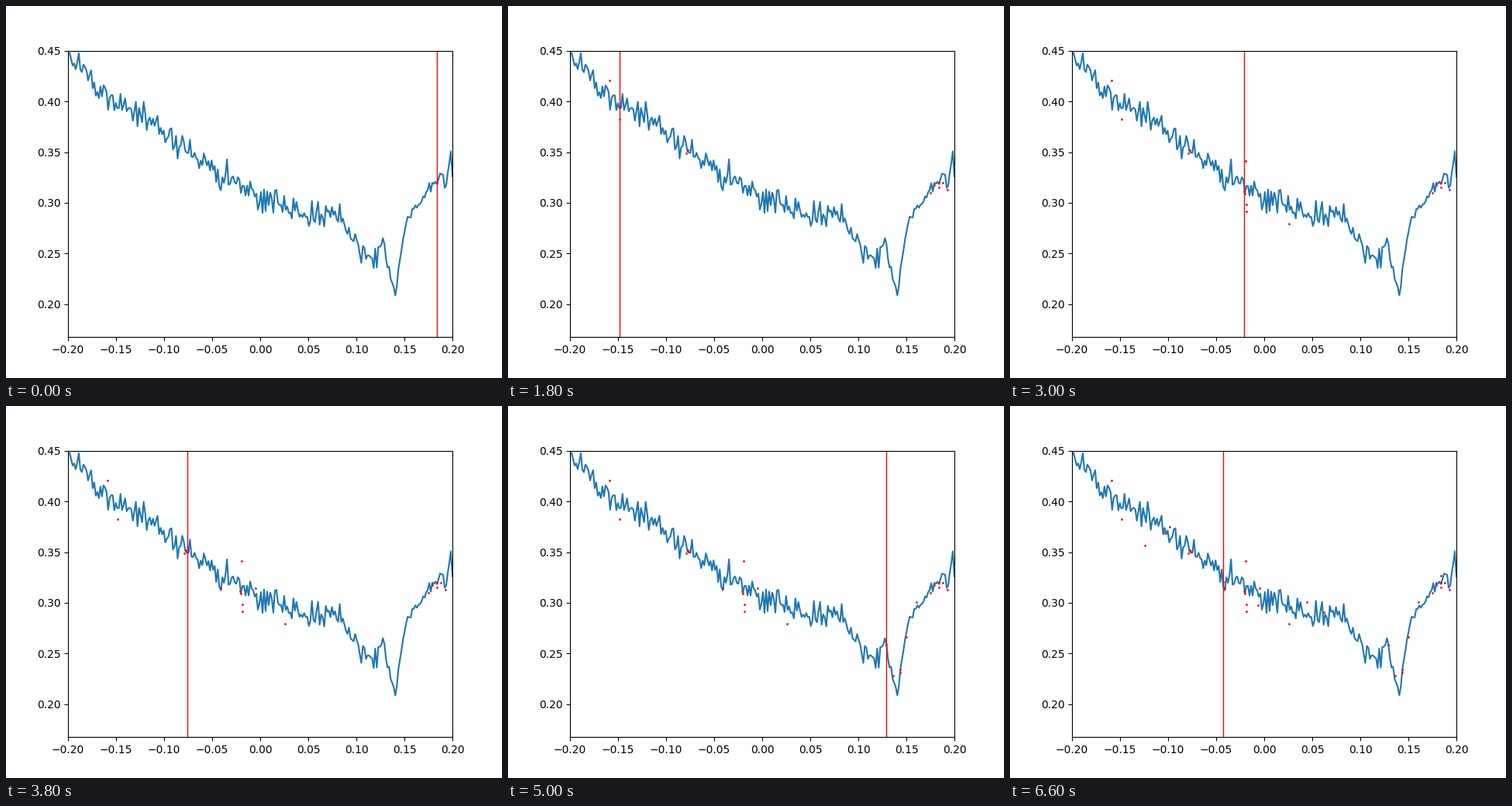
Animation, 640 px wide and 480 px high, one loop 6800 ms. Source, as a matplotlib script:

```python
import numpy as np
import matplotlib.pyplot as plt
from matplotlib.animation import FuncAnimation

W, H, DPI = 640, 480, 100
X_MAX = 0.2
Y_LOW, Y_TOP = 0.1674, 0.4502
AXES_LEFT, AXES_WIDTH = 80, 496
STEP_MS = 200

# Places the search visits, in stage pixels: wide jumps, then short steps
STOPS = np.array([556, 230, 232, 556, 567, 550, 545, 561, 131, 144, 360, 305,
                  305, 304, 303, 302, 95, 322, 277, 234, 527, 506, 506, 514,
                  497, 488, 556, 206, 198, 174, 405, 383, 320, 275])

# Bends of the underlying trend
TREND_X = [-0.2, -0.15, -0.1, -0.05, 0, 0.05, 0.08, 0.097, 0.117, 0.128,
           0.14, 0.152, 0.19, 0.193, 0.198, 0.2]
TREND_Y = [0.447, 0.402, 0.37, 0.333, 0.308, 0.288, 0.293, 0.262, 0.237, 0.26,
           0.21, 0.285, 0.33, 0.308, 0.358, 0.332]


def trend(x):
    return np.interp(x, TREND_X, TREND_Y)


def spread(x, left, right):
    """Noise level, lower on the far side of the dip."""
    return np.where(x < 0.125, left, right)


rng = np.random.default_rng(7)

curve_x = np.linspace(-X_MAX, X_MAX, 250)
curve_noise = np.clip(rng.normal(0, 1, curve_x.size), -2.2, 2.2)
curve_y = trend(curve_x) + curve_noise * spread(curve_x, 0.008, 0.003)

stop_x = (STOPS - AXES_LEFT) / AXES_WIDTH * 2 * X_MAX - X_MAX
stop_noise = np.clip(rng.laplace(0, 1, STOPS.size), -3, 3)
stop_y = trend(stop_x) + stop_noise * spread(stop_x, 0.014, 0.004)

fig, ax = plt.subplots(figsize=(W / DPI, H / DPI), dpi=DPI)
ax.plot(curve_x, curve_y)
marker = ax.axvline(stop_x[0], color="red", lw=1)
dots, = ax.plot([], [], "o", color="red", ms=1)
ax.set_xlim(-X_MAX, X_MAX)
ax.set_ylim(Y_LOW, Y_TOP)


def update(i):
    marker.set_xdata([stop_x[i], stop_x[i]])
    dots.set_data(stop_x[:i + 1], stop_y[:i + 1])
    return marker, dots


anim = FuncAnimation(fig, update, frames=len(STOPS), interval=STEP_MS,
                     repeat=True, repeat_delay=0)
plt.show()
```
